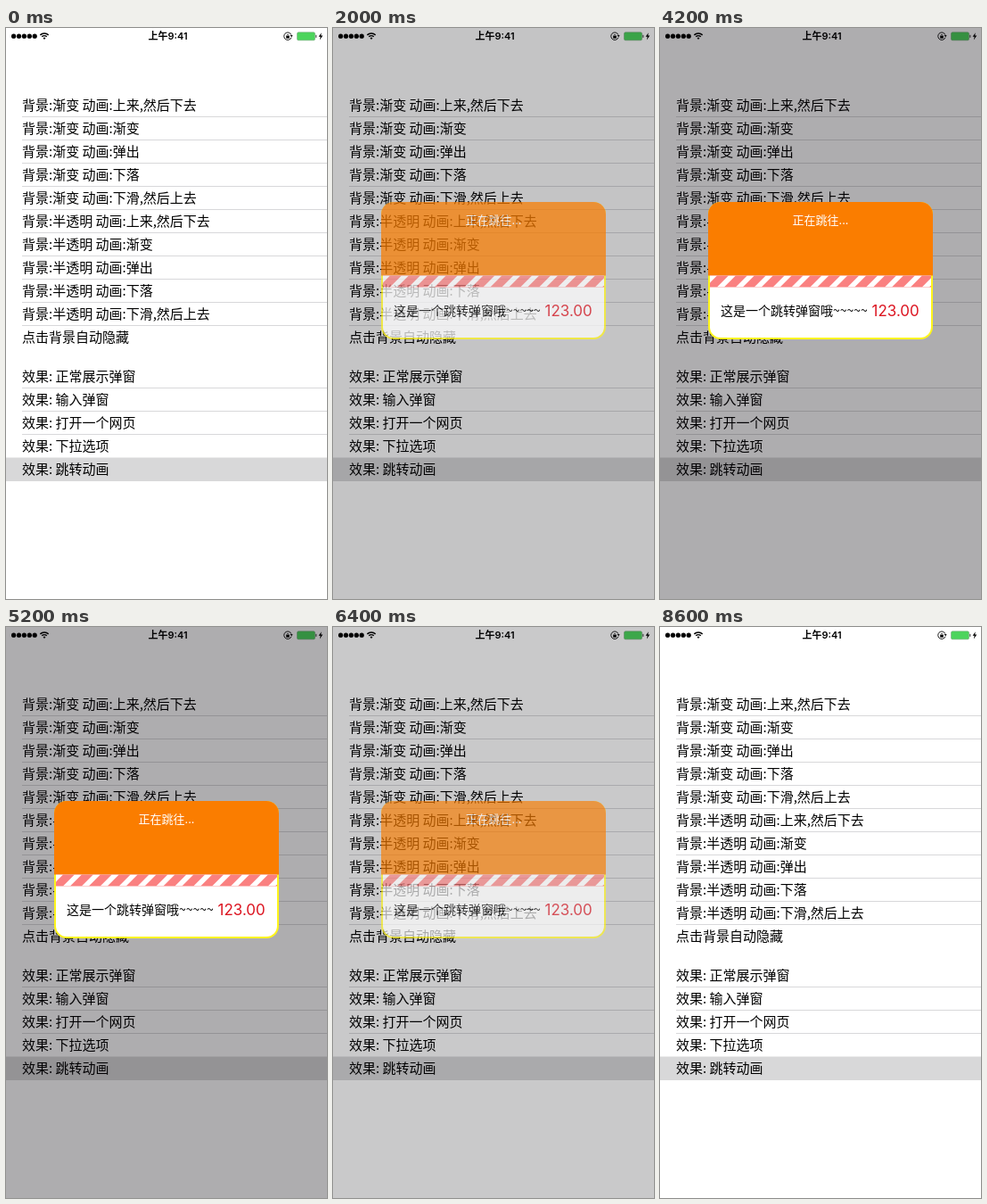
Write an HTML page with a canvas that moves like this. It is 360 by 640 pixels and loops after 8.8 s.

```html
<!DOCTYPE html>
<html lang="zh-CN">
<head>
<meta charset="utf-8">
<title>弹窗</title>
<style>
  html, body { margin: 0; width: 100%; height: 100%; overflow: hidden; background: #fff; }
  canvas { display: block; width: 360px; height: 640px; }
</style>
</head>
<body>
<canvas id="stage" width="360" height="640"></canvas>
<script>
const W = 360, H = 640, LOOP = 8800, STEP = 200;
const FADE = 300, SHOW_AT = 1803, HIDE_AT = 6284, DIM = 0.32;
const CJK = '"Noto Sans CJK SC", "Noto Sans CJK", "Noto Sans", sans-serif';
const LATIN = 'Inter, ' + CJK;
const ctx = document.getElementById('stage').getContext('2d');

const moves = ['上来,然后下去', '渐变', '弹出', '下落', '下滑,然后上去'];
const backgrounds = ['渐变', '半透明'].flatMap(b => moves.map(m => `背景:${b} 动画:${m}`));
const effects = ['正常展示弹窗', '输入弹窗', '打开一个网页', '下拉选项', '跳转动画'].map(e => '效果: ' + e);

function layer(draw) {
  const c = document.createElement('canvas');
  c.width = W;
  c.height = H;
  draw(c.getContext('2d'));
  return c;
}

function text(g, str, x, y, font, color = '#000', align = 'left') {
  g.font = font;
  g.textAlign = align;
  g.fillStyle = color;
  g.fillText(str, x, y);
}

function rounded(g, x, y, w, h, r) {
  g.beginPath();
  g.roundRect(x, y, w, h, r);
}

function polygon(g, ...pts) {
  g.beginPath();
  for (let i = 0; i < pts.length; i += 2) g.lineTo(pts[i], pts[i + 1]);
  g.closePath();
  g.fill();
}

function statusBar(g) {
  g.fillStyle = g.strokeStyle = '#000';
  for (let i = 0; i < 5; i++) {
    g.beginPath();
    g.arc(8.6 + i * 5.9, 9.2, 2.6, 0, 7);
    g.fill();
  }

  // Wi-Fi
  const up = -Math.PI / 2;
  g.lineWidth = 1.5;
  for (const r of [3.9, 6.6]) {
    g.beginPath();
    g.arc(43, 12.6, r, up - 0.78, up + 0.78);
    g.stroke();
  }
  g.beginPath();
  g.moveTo(43, 13);
  g.arc(43, 12.6, 2, up - 0.78, up + 0.78);
  g.fill();

  text(g, '上午9:41', 181.5, 13, `600 11px ${LATIN}`, '#000', 'center');

  // Rotation lock
  g.fillStyle = '#000';
  g.lineWidth = 0.9;
  g.beginPath();
  g.arc(316, 9.2, 4.2, 0.35, 5.9);
  g.stroke();
  polygon(g, 318.6, 8, 321.6, 8, 320.2, 10.2);
  g.fillRect(314.2, 8.8, 3.6, 2.8);
  g.lineWidth = 0.7;
  g.beginPath();
  g.arc(316, 8.7, 1.2, Math.PI, 0);
  g.stroke();

  // Battery
  rounded(g, 326.5, 4.8, 20, 9, 1.5);
  g.fillStyle = '#4cd45c';
  g.fill();
  g.lineWidth = 0.5;
  g.strokeStyle = '#6a9a70';
  g.stroke();
  g.fillStyle = '#555';
  g.fillRect(347.2, 7.8, 1.2, 3);
  g.fillStyle = '#000';
  polygon(g, 353.8, 5.2, 350.6, 9.7, 352.7, 9.7, 351.8, 13.4, 355.3, 8.5, 353.2, 8.5);
}

function rows(g, items, top, lines) {
  items.forEach((item, i) => {
    const y = top + i * 26;
    if (i < lines) {
      g.fillStyle = '#d8d8da';
      g.fillRect(18, y + 25, W - 18, 1);
    }
    text(g, item, 18, y + 18, `15px ${CJK}`);
  });
}

const page = layer(g => {
  g.fillStyle = '#fff';
  g.fillRect(0, 0, W, H);
  statusBar(g);
  rows(g, [...backgrounds, '点击背景自动隐藏'], 74, 10);
  g.fillStyle = '#d8d8d9';
  g.fillRect(0, 481.5, W, 26.5);
  rows(g, effects, 378, 3);
});

const popup = layer(g => {
  rounded(g, 54, 195, 252, 154, 14);
  g.clip();
  g.fillStyle = '#fff51a';
  g.fillRect(54, 195, 252, 154);
  rounded(g, 56, 277, 248, 70, [0, 0, 12, 12]);
  g.fillStyle = '#fff';
  g.fill();
  g.fillStyle = '#fa7d00';
  g.fillRect(54, 195, 252, 82.5);

  // Striped band
  g.save();
  g.beginPath();
  g.rect(56, 277.5, 248, 13);
  g.clip();
  g.fillStyle = '#fa8080';
  g.fillRect(56, 277, 248, 14);
  g.fillStyle = '#fff';
  for (let x = 43; x < 310; x += 20.9) {
    polygon(g, x, 290.5, x + 13, 277.5, x + 21, 277.5, x + 8, 290.5);
  }
  g.restore();

  text(g, '正在跳往...', 180, 220, `13px ${CJK}`, '#fff', 'center');
  text(g, '这是一个跳转弹窗哦~~~~~', 68, 322, `14px ${CJK}`);
  text(g, '123.00', 237.5, 323, `17px ${LATIN}`, '#dc1420');
});

function ease(p) {
  p = Math.min(1, Math.max(0, p));
  return p * p * (3 - 2 * p);
}

let start;
function frame(now) {
  start ??= now;
  const t = Math.floor(((now - start) % LOOP) / STEP) * STEP;
  const alpha = ease((t - SHOW_AT) / FADE) - ease((t - HIDE_AT) / FADE);
  ctx.globalAlpha = 1;
  ctx.drawImage(page, 0, 0);
  if (alpha > 0) {
    ctx.fillStyle = `rgba(4, 0, 8, ${DIM * alpha})`;
    ctx.fillRect(0, 0, W, H);
    ctx.globalAlpha = alpha;
    ctx.drawImage(popup, 0, 0);
  }
  requestAnimationFrame(frame);
}
requestAnimationFrame(frame);
</script>
</body>
</html>
```
